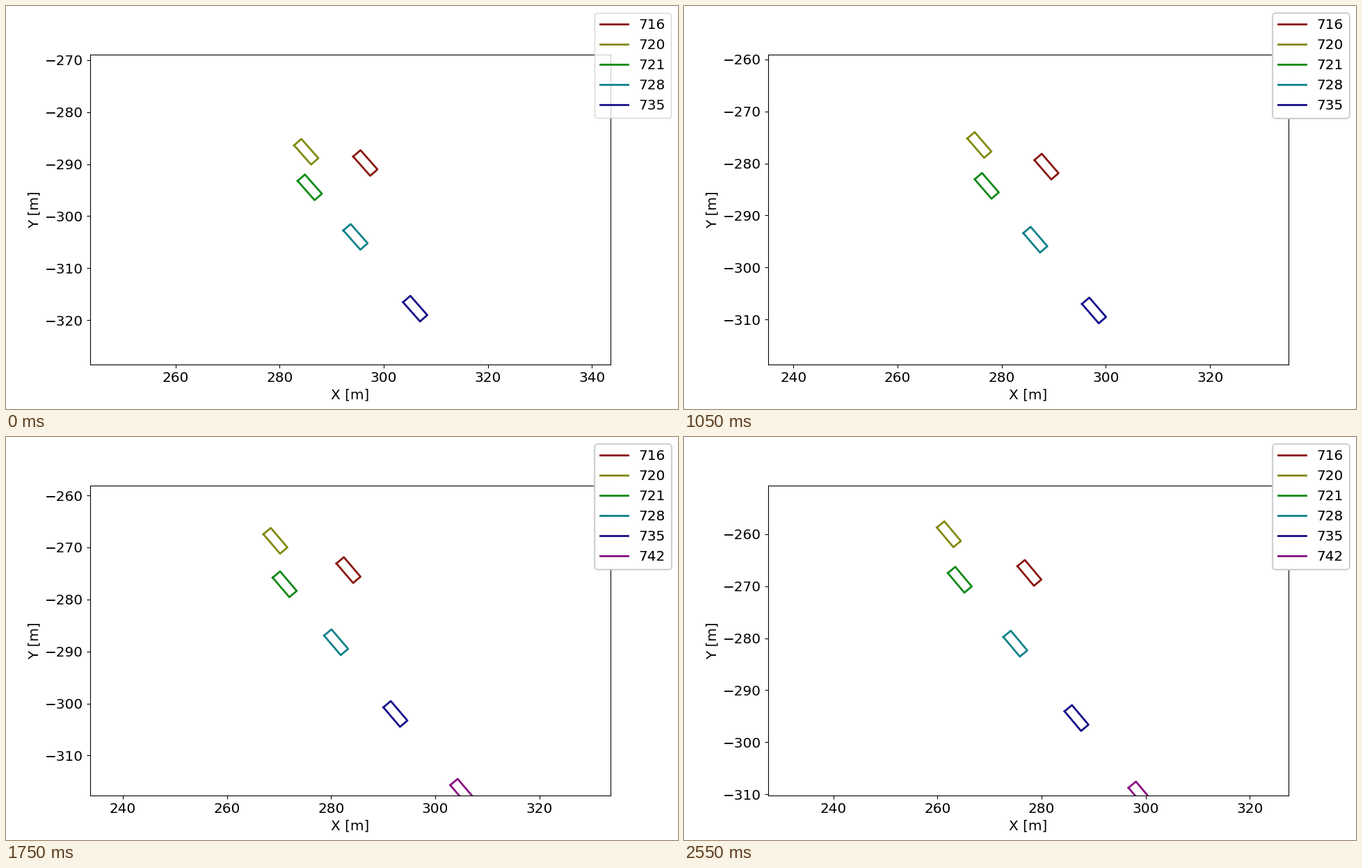
Recreate the animation shown at these times as a matplotlib script. Size 966 by 580 pixels, loop 2.6 s.

```python
import colorsys

import matplotlib.pyplot as plt
import numpy as np
from matplotlib.animation import FuncAnimation
from matplotlib.ticker import MultipleLocator

FRAMES, INTERVAL = 52, 50
JOIN = 26            # step at which the last car comes into view
STACK = 12           # translucent legends lying on top of each other
LENGTH, WIDTH = 4.93, 1.86
HEADINGS = np.radians([131.4, 130.0])   # at the first and last step
HALF_W = 50.0
HALF_H = HALF_W * (580 * 0.77) / (966 * 0.775)

# Path of the group's centre, in metres
PATH_T = np.array([0, 7, 15, 21, 29, 40, 51])
PATH_X = np.array([293.60, 290.93, 287.69, 285.12, 281.96, 277.31, 273.17])
PATH_Y = np.array([-298.72, -295.71, -291.90, -288.85, -285.05, -279.61, -274.53])

# Offset of each car from that centre at three times
DRIFT_T = [0, 29, 51]
CARS = {
    "716": [(2.87, 8.94), (3.73, 7.95), (4.49, 7.08)],
    "720": [(-8.48, 11.10), (-9.80, 12.94), (-10.97, 14.51)],
    "721": [(-7.80, 4.26), (-8.16, 4.78), (-8.87, 5.76)],
    "728": [(0.98, -5.26), (1.46, -6.00), (1.79, -6.53)],
    "735": [(12.44, -19.06), (12.77, -19.68), (13.54, -20.82)],
    "742": [(26.47, -35.97), (25.82, -34.84), (25.82, -35.52)],
}
DRIFT = [np.polyfit(DRIFT_T, keys, 2) for keys in CARS.values()]


def hermite(t, times, values):
    """Smooth curve through the given points."""
    slopes = np.gradient(values, times)
    k = int(np.clip(np.searchsorted(times, t, side="right") - 1, 0, len(times) - 2))
    h = times[k + 1] - times[k]
    u = (t - times[k]) / h
    return ((1 + 2 * u) * (1 - u) ** 2 * values[k]
            + u * (1 - u) ** 2 * h * slopes[k]
            + u * u * (3 - 2 * u) * values[k + 1]
            + u * u * (u - 1) * h * slopes[k + 1])


def car_outline(heading):
    """Closed rectangle around the origin, starting at the front left corner."""
    ahead = np.array([np.cos(heading), np.sin(heading)]) * LENGTH / 2
    left = np.array([-np.sin(heading), np.cos(heading)]) * WIDTH / 2
    return np.array([ahead + left, ahead - left, -ahead - left,
                     -ahead + left, ahead + left])


def car_color(i):
    return colorsys.hls_to_rgb(0.01 + i / 6, 0.3, 0.8)


plt.rcParams["font.family"] = "DejaVu Sans"
for key in ("axes.labelsize", "xtick.labelsize", "ytick.labelsize", "legend.fontsize"):
    plt.rcParams[key] = "x-large"

fig, ax = plt.subplots(figsize=(9.66, 5.8), dpi=100)
ax.set_xlabel("X [m]")
ax.set_ylabel("Y [m]")
ax.xaxis.set_major_locator(MultipleLocator(20))
ax.yaxis.set_major_locator(MultipleLocator(10))

lines = [ax.plot([], [], color=car_color(i), lw=2, label=name)[0]
         for i, name in enumerate(CARS)]


def legend_stack(handles):
    return [fig.legend(handles=handles, loc="upper right") for _ in range(STACK)]


short_legends = legend_stack(lines[:-1])
long_legends = legend_stack(lines)


def show_first(legends, count):
    for k, legend in enumerate(legends):
        legend.set_visible(k < count)


def update(step):
    joined = step >= JOIN
    count = len(lines) if joined else len(lines) - 1
    group = np.array([hermite(step, PATH_T, PATH_X), hermite(step, PATH_T, PATH_Y)])
    places = [group + np.array([step ** 2, step, 1]) @ coef for coef in DRIFT[:count]]

    outline = car_outline(np.interp(step, [0, FRAMES - 1], HEADINGS))
    for line, place in zip(lines, places):
        line.set_data(*(outline + place).T)
    lines[-1].set_visible(joined)

    # The view follows the mean position of all visible cars
    cx, cy = np.mean(places, axis=0)
    ax.set_xlim(cx - HALF_W, cx + HALF_W)
    ax.set_ylim(cy - HALF_H, cy + HALF_H)

    n_long = min(max(step - JOIN + 1, 0), STACK)
    show_first(short_legends, min(step + 1, STACK) - n_long)
    show_first(long_legends, n_long)
    return lines


anim = FuncAnimation(fig, update, frames=FRAMES, interval=INTERVAL,
                     repeat=True, repeat_delay=0, blit=False)
plt.show()
```
